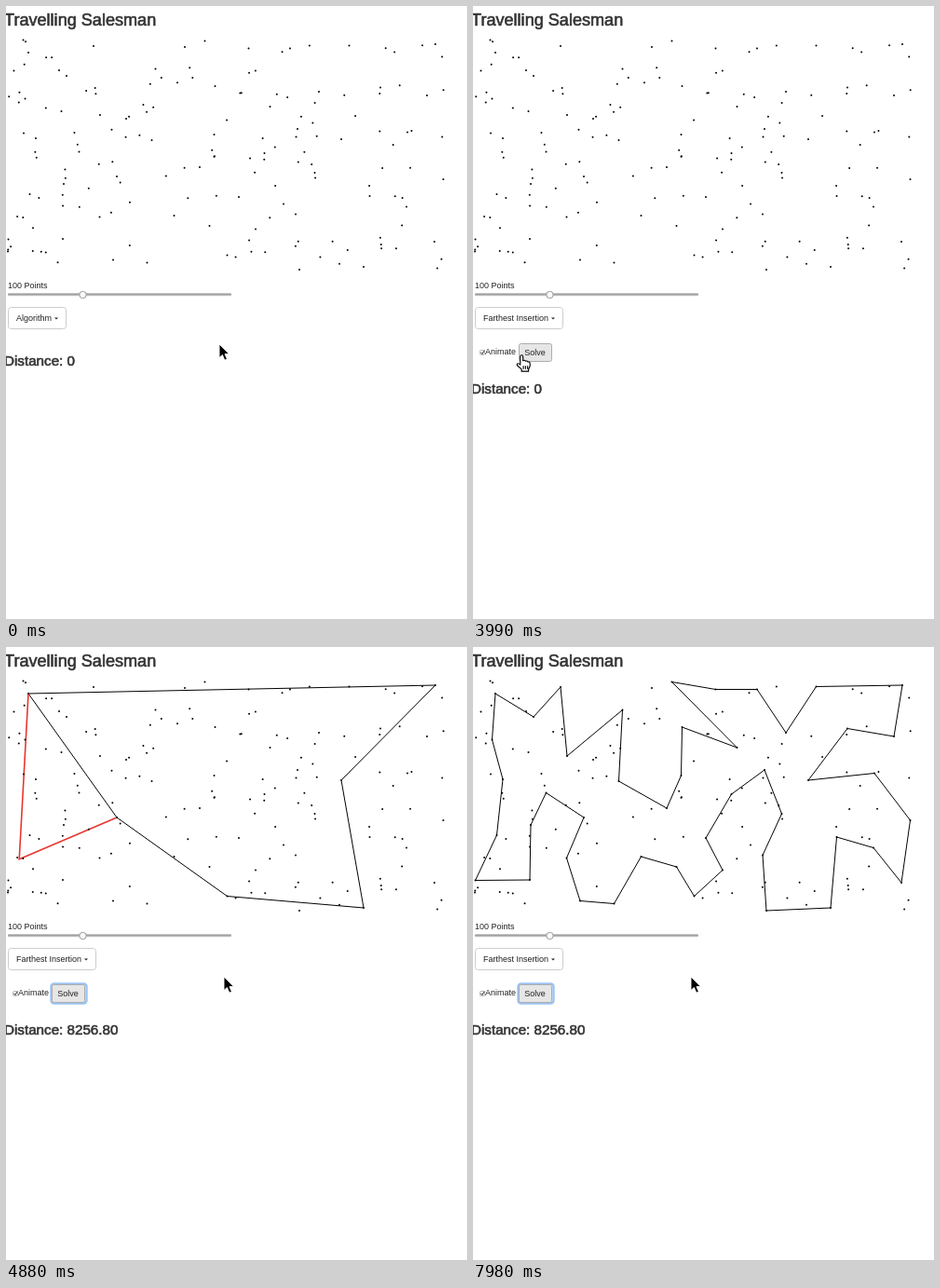
These frames come from a looping animation (495 by 658 pixels, 8000 ms). An HTML page:

```html
<!DOCTYPE html>
<html lang="en">
<head>
<meta charset="utf-8">
<title>Travelling Salesman</title>
<style>
  html, body { margin: 0; width: 100%; height: 100%; overflow: hidden; background: #fff; }
  svg { display: block; font: 9px "Liberation Sans", Arial, sans-serif; fill: #222; }
  .head { fill: #333; stroke: #333; stroke-width: .6; }
  .btn { fill: #fff; stroke: #ccc; }
  .btn.on { fill: #e6e6e6; stroke: #adadad; }
  #tour { fill: none; stroke: #000; }
  #pending { fill: none; stroke: #e8352e; stroke-width: 1.6; }
  #menu .group { fill: #777; font-size: 9.1px; }
</style>
</head>
<body>
<svg width="495" height="658" viewBox="0 0 495 658">
  <defs>
    <linearGradient id="track" x2="0" y2="1">
      <stop stop-color="#888"/><stop offset="1" stop-color="#ccc"/>
    </linearGradient>
    <filter id="shadow" x="-10%" width="120%" y="-10%" height="120%">
      <feDropShadow dx="0" dy="3" stdDeviation="2.5" flood-opacity=".18"/>
    </filter>
  </defs>

  <text class="head" x="-2" y="21" font-size="18.1">Travelling Salesman</text>
  <path id="tour"/>
  <path id="pending"/>
  <g id="dots" fill="#000"></g>
  <g id="loading">
    <rect x="2" y="34" width="480" height="245" fill="#d2d2d2" opacity=".5"/>
    <text class="head" x="242" y="65" font-size="18.4" text-anchor="middle">Loading</text>
  </g>

  <text x="2" y="303">100 Points</text>
  <rect x="2" y="308.5" width="240" height="2.7" rx="1" fill="url(#track)"/>
  <circle cx="82.5" cy="310" r="3.7" fill="#fafafa" stroke="#999"/>

  <rect class="btn" id="picker" x="2.5" y="323.5" height="23" rx="3"/>
  <text id="choice" x="11" y="338"></text>
  <path id="caret" d="M0 334.500h4l-2 2z"/>

  <g id="solver">
    <rect x="7.5" y="369.5" width="5" height="5" rx="1" fill="#eee" stroke="#aaa" stroke-width=".8"/>
    <path d="M8.4 372l1.4 1.6 2.6-4" fill="none" stroke="#333"/>
    <text x="13" y="374">Animate</text>
    <rect id="focus" x="48.5" y="361.5" width="38" height="21" rx="3" fill="none" stroke="#9cc4f2" stroke-width="2.4"/>
    <rect class="btn" id="solve" x="49.5" y="362.5" width="35" height="19" rx="2"/>
    <text x="55.3" y="375">Solve</text>
  </g>
  <text class="head" id="distance" x="-2" font-size="15.2"></text>

  <g id="menu">
    <rect x="-5" y="353.5" width="117.5" height="166" rx="2" fill="#fff" stroke="#bbb" filter="url(#shadow)"/>
    <rect id="fading" width="112" height="15" fill="#fafafa"/>
    <rect id="hovered" width="112" height="15" fill="#f5f5f5"/>
    <path d="M0 436.5h112" stroke="#e5e5e5"/>
  </g>

  <g id="cursor" stroke-linejoin="round">
    <path id="arrow" d="M0 0v14.5l3.4-3 2.4 5.7 2.6-1.1-2.4-5.5h4.6z" fill="#000" stroke="#fff" stroke-width=".9"/>
    <path id="hand" transform="translate(-.7 -1) scale(1.12)" d="M4 9V2.2q0-1.5 1.3-1.5t1.3 1.5V6q1.7-1 2.4.5 1.6-.8 2.3.7 2-.4 2 1.5v2.5l-1.4 3v2H5.2v-2L1.2 10.7q-1-1.6.5-2 1-.2 2.3 1.3zM7 11v3M9 11v3M11 11v3" fill="#fff" stroke="#000"/>
  </g>
</svg>

<script>
const $ = id => document.getElementById(id);
const put = (id, attrs) => {
  for (const key in attrs) $(id).setAttribute(key, attrs[key]);
};
const show = (id, visible) => put(id, { visibility: visible ? "visible" : "hidden" });
const add = (parent, tag, attrs, text = "") => {
  const node = document.createElementNS("http://www.w3.org/2000/svg", tag);
  for (const key in attrs) node.setAttribute(key, attrs[key]);
  node.textContent = text;
  $(parent).append(node);
};
const mix = (a, b, p) => a + (b - a) * p;
const mixPoint = (a, b, p) => [mix(a[0], b[0], p), mix(a[1], b[1], p)];

const LOOP = 8000, STEP = 147.7;   // the screen refreshes once per step
const OPEN = 9, CHOSEN = 18, CLICKED = 29, SOLVING = 30;

// Key stops in order of insertion; the tour itself is computed from them.
const landmarks = [
  [24,50], [384,280], [461,41], [237.5,267.5], [119,183], [360,143], [2.5,250.5], [260.5,45.5],
  [469.5,186], [223.5,138], [160.5,67.5], [32,142], [115,272.5], [311,223.5], [180.5,225],
  [94,43], [390.5,204], [460,253], [283.5,108], [250,205], [101,117], [431,135.5],
  [368.5,42.5], [315,283], [156.5,144], [61,250], [78.5,156.5], [331.5,179], [452,96],
  [336,92], [305,45.5], [224.5,86], [213.5,37.5], [313,132], [277.5,158], [25.5,202],
  [65,75], [20.5,99.5], [218.5,236], [151.5,275.5], [402,87.5], [100.5,226.5],
  [430,215.5], [208,173], [62,191], [268,239.5]
];

let seed = 7;
const random = () => (seed = seed * 16807 % 2147483647) / 2147483647;
// Strays lie a little denser towards the left.
const strays = Array.from({ length: 125 }, () => [2 + 470 * random() ** 1.3, 36 + 247 * random()]);
const stops = [...landmarks, ...strays];
for (const [cx, cy] of stops) add("dots", "circle", { cx, cy, r: 1 });

// Cheapest insertion: each stop joins the tour where the detour is shortest.
const distance = (a, b) => Math.hypot(a[0] - b[0], a[1] - b[1]);
const insertions = [];
let tour = [stops[0]];
for (const stop of stops.slice(1)) {
  const detours = tour.map((b, k) => {
    const a = tour.at(k - 1);
    return distance(a, stop) + distance(stop, b) - distance(a, b);
  });
  const k = detours.indexOf(Math.min(...detours));
  insertions.push({ tour, stop, a: tour.at(k - 1), b: tour[k] });
  tour = tour.toSpliced(k, 0, stop);
}

const groups = [
  [368, "Deterministic heuristics", "In Order", "Nearest Neighbor", "Nearest Insertion", "Farthest Insertion"],
  [452, "Randomized heuristics", "Iterative Two Opt", "Hill Climber", "Simulated Annealing", "Genetic Algorithm"]
];
for (const [top, ...labels] of groups)
  labels.forEach((label, k) =>
    add("menu", "text", { x: 8, y: top + 15 * k, class: k ? "" : "group" }, label));

// Pointer moves: first step, last step, destination.
const moves = [
  [0, 8, [40, 334]], [11, 16, [53, 422]], [21, 27, [47, 375]], [29, 33, [234, 354]]
];
function pointerAt(step) {
  let point = [229, 363];
  for (const [start, end, goal] of moves) {
    const p = Math.min(1, Math.max(0, (step - start) / (end - start)));
    point = mixPoint(point, goal, p ** 1.5);
  }
  return point;
}

function highlight(id, step, open) {
  const row = Math.floor((pointerAt(step)[1] - 372) / 15);
  show(id, open && row >= 0);
  put(id, { y: 372.5 + 15 * row });
}

function drawTour(step) {
  const running = step >= SOLVING;
  show("tour", running);
  show("pending", running);
  if (!running) return;
  // The solver slows down slightly as the tour grows.
  const progress = 6.83 + 1.8925 * (step - 33) - 0.0425 * Math.max(0, step - 41);
  const count = Math.floor(progress), p = progress - count;
  const { tour, stop, a, b } = insertions[count - 1];
  const tip = mixPoint(mixPoint(a, b, 0.5), stop, p);
  put("tour", { d: `M${tour.join("L")}Z` });
  put("pending", { d: p < 0.1 ? "" : `M${a}L${tip}L${b}` });
}

function draw(now) {
  const step = Math.floor((now % LOOP + 14) / STEP);
  const chosen = step >= CHOSEN;
  const open = step >= OPEN && !chosen;

  put("picker", { width: chosen ? 94 : 62, class: step >= 7 && !chosen ? "btn on" : "btn" });
  $("choice").textContent = chosen ? "Farthest Insertion" : "Algorithm";
  put("caret", { transform: `translate(${chosen ? 84 : 52})` });
  show("menu", open);
  highlight("hovered", Math.min(step, 16), open);
  highlight("fading", Math.min(step, 16) - 1, open);

  show("solver", chosen);
  show("focus", step >= CLICKED);
  put("solve", { class: step >= 26 ? "btn on" : "btn" });
  show("loading", step === CLICKED);
  $("distance").textContent = "Distance: " + (step >= SOLVING ? "8256.80" : "0");
  put("distance", { y: chosen ? 416 : 386 });
  drawTour(step);

  const hand = step >= 7 && !chosen || step >= 26 && step < SOLVING;
  show("hand", hand);
  show("arrow", !hand);
  put("cursor", { transform: `translate(${pointerAt(step)})` });
  requestAnimationFrame(draw);
}
requestAnimationFrame(draw);
</script>
</body>
</html>
```
